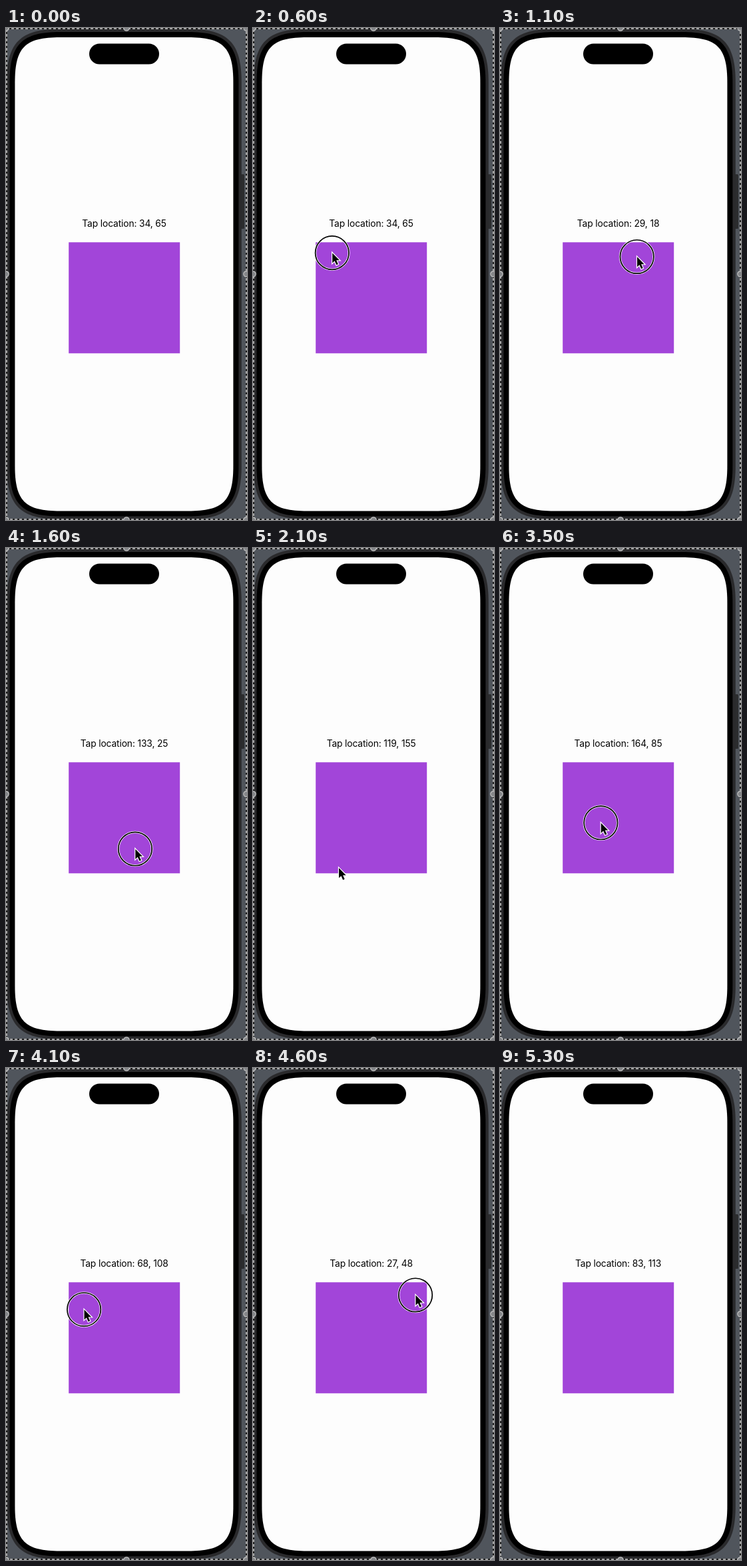
An HTML page for the animation above (5900 ms loop, 362 px wide and 740 px high).

```html
<!DOCTYPE html>
<html lang="en">
<head>
<meta charset="utf-8">
<title>Tap location</title>
<style>
  html, body { margin: 0; width: 100%; height: 100%; overflow: hidden; background: #50555c; }
  svg { display: block; width: 362px; height: 740px; }
  text { font: 13.8px Inter, Roboto, sans-serif; letter-spacing: -.13px; text-anchor: middle; }
  #ring circle { fill: none; }
</style>
</head>
<body>
<svg viewBox="0 0 362 740">
  <rect x="352" y="220" width="6" height="82" rx="1.5" fill="#2b2c2e"/>
  <g id="phone"></g>
  <rect x="125" y="23.5" width="105" height="31" rx="15.5"/>

  <g fill="none" stroke-width="2">
    <rect x="1" y="1" width="360" height="738" stroke="#222"/>
    <rect x="1" y="1" width="360" height="738" stroke="#a4a4a4" stroke-dasharray="4 3"/>
  </g>
  <g id="handles" fill="#85878a" stroke="#c4c4c4" stroke-width="1.2"></g>

  <text id="label" x="177.6" y="299"></text>
  <rect x="94.2" y="322.3" width="167" height="167" fill="#a245d9"/>

  <g id="pointer">
    <g id="ring">
      <circle cx=".4" cy=".8" r="25.2" stroke="#fff" stroke-width="3.2"/>
      <circle cx=".4" cy=".8" r="25.2" stroke="#000" stroke-width="1.7"/>
    </g>
    <path d="M.8 1.2V16.2L4.2 13L6.9 19L9.4 17.9L6.8 12H11.4Z"
          stroke="#fff" stroke-width="2.4" paint-order="stroke"/>
  </g>
</svg>
<script>
const $ = id => document.getElementById(id);
const LOOP = 5900, STEP = 100, SHOW = 300, HIDE = 5300;
const TRAVEL = 300, PRESS = 100;

// release time and place in the square, in points
const taps = [
  [700, 29, 18], [1200, 133, 25], [1700, 119, 155], [2300, 34, 192], [2800, 164, 173],
  [3200, 164, 85], [3600, 68, 108], [4200, 27, 48], [4700, 179, 22], [5200, 83, 113],
];

const easeOut = p => 1 - (1 - p) ** 2.3;

function pose(t) {
  let x = 66, y = 163, pressed = false, label = "34, 65";
  taps.forEach(([release, tx, ty], i) => {
    const press = release - PRESS;
    const p = easeOut(Math.min(1, Math.max(0, (t - press) / TRAVEL + 1)));
    x += (tx - x) * p;
    y += (ty - y) * p;
    // the final tap is too quick for its ring to show
    if (t >= press && t < release && i < taps.length - 1) pressed = true;
    if (t >= release) label = `${tx}, ${ty}`;
  });
  return { x: 94.2 + x * .835, y: 322.3 + y * .835, pressed, label };
}

// screen outline grown by d, with smooth corners
function outline(d, fill) {
  const l = 13.4 - d, t = 14 - d, r = 341.4 + d, b = 726.4 + d;
  const e = 68 + d, c = 15 + .43 * d;
  return `<path fill="${fill}" d="M${l + e} ${t}H${r - e}
    C${r - c} ${t} ${r} ${t + c} ${r} ${t + e}V${b - e}
    C${r} ${b - c} ${r - c} ${b} ${r - e} ${b}H${l + e}
    C${l + c} ${b} ${l} ${b - c} ${l} ${b - e}V${t + e}
    C${l} ${t + c} ${l + c} ${t} ${l + e} ${t}Z"/>`;
}
$("phone").innerHTML = outline(12.4, "#2a2a2c") + outline(8, "#000") + outline(0, "#fdfdfd");

for (const x of [0, 181, 361])
  for (const y of [0, 370, 740])
    if (x !== 181 || y !== 370)
      $("handles").innerHTML += `<circle cx="${x}" cy="${y}" r="4.2"/>`;

const show = (id, on) => $(id).setAttribute("visibility", on ? "inherit" : "hidden");
const start = performance.now();

function draw() {
  const now = Math.max(0, performance.now() - start) % LOOP;
  const t = Math.floor(now / STEP) * STEP;
  const { x, y, pressed, label } = pose(t);
  $("label").textContent = "Tap location: " + label;
  $("pointer").setAttribute("transform", `translate(${x} ${y})`);
  show("pointer", t >= SHOW && t < HIDE);
  show("ring", pressed);
  requestAnimationFrame(draw);
}
draw();
</script>
</body>
</html>
```
